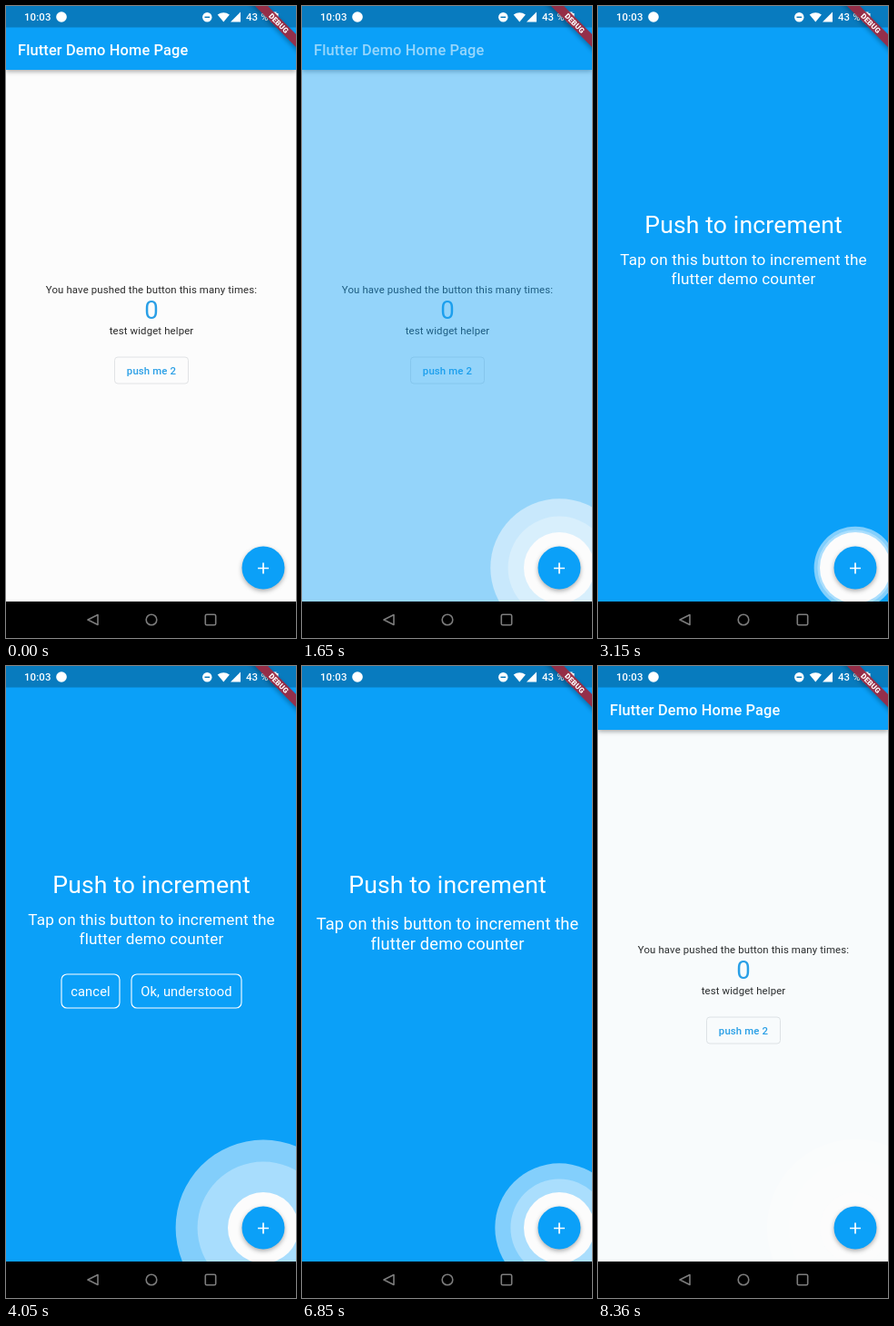
These frames come from a looping animation (319x693 px, 8.41 s). An HTML page:

```html
<!DOCTYPE html>
<html lang="en">
<head>
<meta charset="utf-8">
<style>
  html, body { margin: 0; width: 100%; height: 100%; overflow: hidden; background: #fcfcfc; }
  svg { display: block; width: 319px; height: 693px; font-family: Roboto, sans-serif; }
  text { letter-spacing: .13px; }
  .mid { text-anchor: middle; }
  .medium { font-weight: 500; }
  .raised { filter: drop-shadow(0 2px 2.5px rgba(0, 0, 0, .32)); }
  .line { fill: none; stroke: #fff; stroke-width: 1.1; }
  .nav { fill: none; stroke: #7c7c7c; stroke-width: 1.6; stroke-linejoin: round; }
</style>
</head>
<body>
<svg viewBox="0 0 319 693">
  <mask id="hole" maskUnits="userSpaceOnUse" x="0" y="0" width="319" height="693">
    <rect width="319" height="693" fill="#fff"/>
    <circle cx="283" cy="616" r="39"/>
  </mask>

  <!-- page -->
  <rect width="319" height="693" fill="#fcfcfc"/>
  <rect class="raised" width="319" height="70" fill="#0ba0f8"/>
  <text class="medium" x="13" y="53.5" font-size="16.4" fill="#fff">Flutter Demo Home Page</text>
  <g class="mid" font-size="11.4" fill="#2b2b2b">
    <text x="160" y="314.5">You have pushed the button this many times:</text>
    <text x="160" y="343" font-size="27.6" fill="#2a9fe6">0</text>
    <text x="160" y="359.5">test widget helper</text>
    <rect x="119.5" y="385" width="81" height="29" rx="3.5" fill="none" stroke="#e1e3e5"/>
    <text class="medium" x="160" y="403.7" fill="#2a9fe6">push me 2</text>
  </g>
  <g class="raised">
    <circle cx="283" cy="616" r="23.5" fill="#0ba0f8"/>
  </g>
  <path d="M277 616.5h12M283 610.500v12" stroke="#fff" stroke-width="1.7"/>

  <!-- helper overlay -->
  <g id="overlay" mask="url(#hole)" opacity="0">
    <rect width="319" height="693" fill="#0ba0f8"/>
    <circle id="outer" cx="283" cy="616" r="39" fill="#fff" opacity=".49"/>
    <circle id="inner" cx="283" cy="616" r="39" fill="#fff" opacity=".31"/>
    <g class="mid" fill="#fff">
      <g id="title"><text y="9.5" font-size="26.6">Push to increment</text></g>
      <g id="info" font-size="17.2">
        <text y="-4.500">Tap on this button to increment the</text>
        <text y="16.2">flutter demo counter</text>
      </g>
      <g id="cancel" font-size="14.7">
        <rect class="line" x="-32" y="-18.500" width="64" height="37" rx="6"/>
        <text y="5.300">cancel</text>
      </g>
      <g id="ok" font-size="14.7">
        <rect class="line" x="-60.500" y="-18.500" width="121" height="37" rx="6"/>
        <text y="5.300">Ok, understood</text>
      </g>
    </g>
  </g>

  <!-- status bar -->
  <rect width="319" height="23.500" opacity=".23"/>
  <g fill="#fff">
    <text class="medium" x="20" y="16" font-size="11.400">10:03</text>
    <circle cx="61" cy="12" r="5.800"/>
    <circle cx="221.300" cy="12.300" r="5.200"/>
    <path d="M218.500 12.300h5.600" stroke="#0b7bbd" stroke-width="1.500"/>
    <path d="M232.700 9.500Q239.300 4.800 245.900 9.500L239.300 17.500Z"/>
    <path d="M247 17.500L258 6.500V17.500Z"/>
    <text class="medium" x="264" y="16" font-size="11.400">43 %</text>
    <path d="M291.500 8h2v-1.500h4v1.500h2v10h-8z"/>
  </g>
  <g transform="translate(300 19) rotate(45)">
    <rect class="raised" x="-40" y="-5" width="80" height="10" fill="#9c2a41" opacity=".95"/>
    <text class="mid" y="2.900" font-size="8.200" font-weight="900" fill="#fff">DEBUG</text>
  </g>

  <!-- navigation bar -->
  <rect y="653" width="319" height="40"/>
  <g class="nav">
    <path d="M90 673L101 667.500V678.500Z"/>
    <circle cx="160" cy="673" r="5.800"/>
    <rect x="219.300" y="667.300" width="11.400" height="11.400" rx="1.500"/>
  </g>
</svg>
<script>
const LOOP = 8410, STEP = 50, MIRROR = 9750;
const byId = id => document.getElementById(id);
const clamp = v => Math.max(0, Math.min(1, v));

function bezier(x1, y1, x2, y2) {
  const at = (u, a, b) => 3 * (1 - u) ** 2 * u * a + 3 * (1 - u) * u * u * b + u ** 3;
  return x => {
    if (x <= 0 || x >= 1) return clamp(x);
    let lo = 0, hi = 1;
    for (let i = 0; i < 24; i++) {
      const u = (lo + hi) / 2;
      if (at(u, x1, x2) < x) lo = u; else hi = u;
    }
    return at(lo, y1, y2);
  };
}
const easeIn = bezier(.42, 0, 1, 1);
const easeOut = bezier(0, 0, .58, 1);
const easeInOutBack = bezier(.68, -.55, .265, 1.55);

// Each item pops in while sliding down to its centre (x, y).
const items = [
  { id: 'title', x: 160, y: 239, start: 2100, length: 600 },
  { id: 'info', x: 160, y: 288.5, start: 2450, length: 500 },
  { id: 'cancel', x: 93, y: 356.5, start: 3050, length: 600 },
  { id: 'ok', x: 198.5, y: 356.5, start: 3050, length: 600 },
];

function draw(ms) {
  let t = Math.floor(ms / STEP) * STEP;
  if (t >= 4250 && t < 4550) t = 4250;     // brief stall
  const stage = Math.min(t, MIRROR - t);   // closing replays the opening backwards

  byId('overlay').setAttribute('opacity', easeIn(clamp((stage - 1350) / 500)));

  const phase = Math.max(0, (t - 1215) / 1000) % 2;
  const pulse = phase < 1 ? phase : 2 - phase;
  byId('outer').setAttribute('r', 39 + 60 * easeOut(pulse));
  byId('inner').setAttribute('r', 39 + 40 * pulse);

  for (const { id, x, y, start, length } of items) {
    const k = clamp((stage - start) / length);
    const scale = Math.max(0, easeInOutBack(k));
    byId(id).setAttribute('transform', `translate(${x} ${y - 84 * (1 - scale)}) scale(${scale})`);
    byId(id).setAttribute('opacity', clamp(k * 1.7));
  }
}

function tick() {
  draw(performance.now() % LOOP);
  requestAnimationFrame(tick);
}
tick();
</script>
</body>
</html>
```
